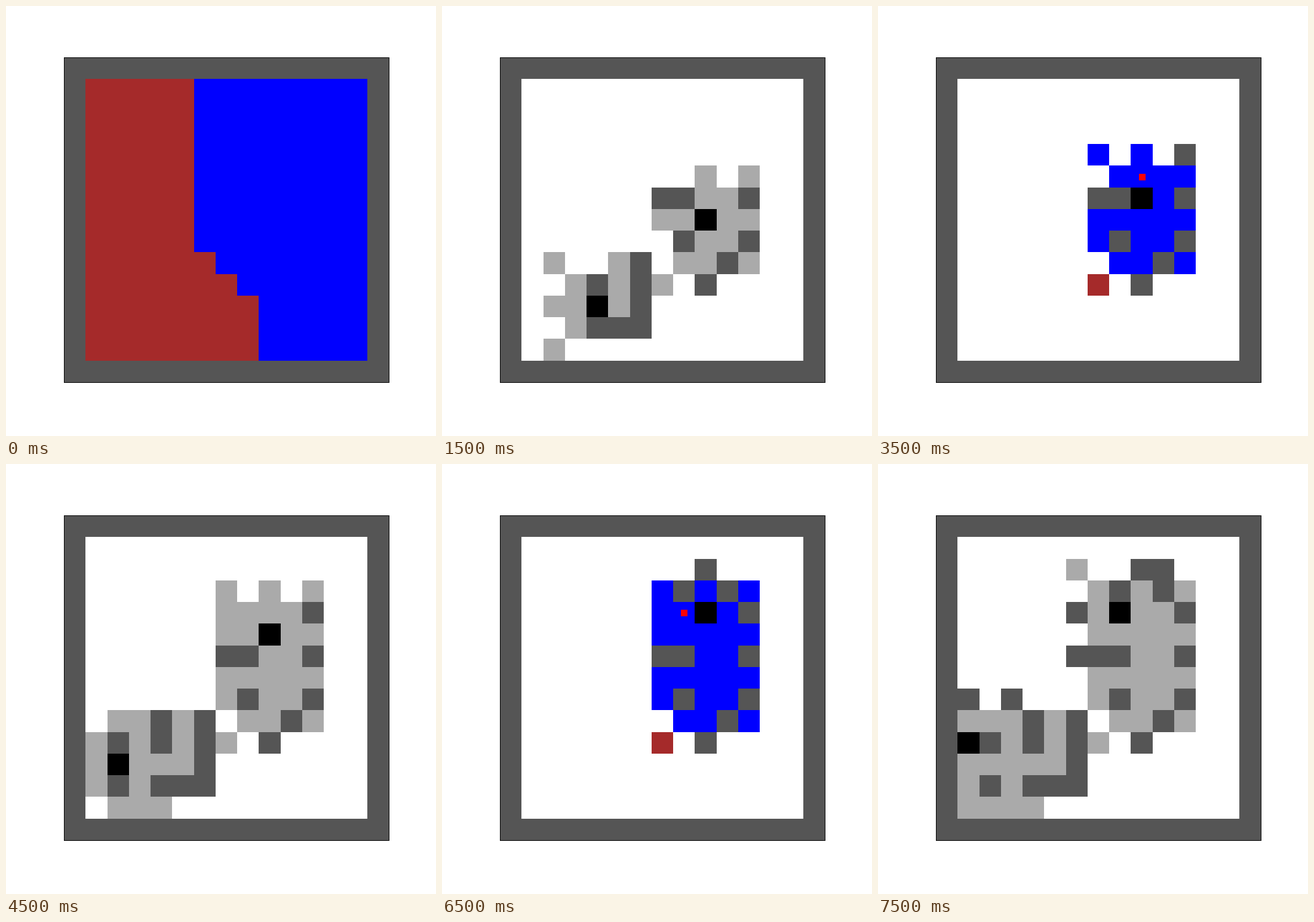
An HTML page with a canvas for the animation above (8 s loop, 720 by 720 pixels).

```html
<!DOCTYPE html>
<html lang="en">
<head>
<meta charset="utf-8">
<title>Two robots exploring a grid</title>
<style>
  html, body { margin: 0; width: 100%; height: 100%; overflow: hidden; background: #fff; }
  canvas { display: block; width: 720px; height: 720px; }
</style>
</head>
<body>
<canvas id="stage" width="720" height="720"></canvas>
<script>
const ctx = document.getElementById('stage').getContext('2d');

const STEP = 500, STEPS = 16;
const SIZE = 15, CELL = 544 / SIZE, LEFT = 97, TOP = 86;
const WALL = '#555555', SEEN = '#aaaaaa';

// Inner 13 x 13 cells; everything outside counts as wall.
const world = [
  '.............',
  '........##...',
  '.......#.#...',
  '.....#....#..',
  '.............',
  '.....###..#..',
  '.............',
  '#.#....#..#..',
  '...#.#...#...',
  '.#.#.#..#....',
  '.....#.......',
  '.#.###.......',
  '.............'
];

// One position [column, row] per turn.
const blue = { color: '#0000ff', path: [[9, 8], [9, 7], [9, 6], [9, 5], [9, 4], [8, 4]] };
const brown = { color: '#a52a2a', path: [[5, 11], [4, 11], [3, 11], [2, 11], [1, 11], [1, 10]] };

const edgeX = c => Math.round(LEFT + c * CELL);
const edgeY = r => Math.round(TOP + r * CELL);
const isWall = (c, r) => (world[r - 1] || '')[c - 1] !== '.';

function fillCell(c, r, color) {
  const x = edgeX(c), y = edgeY(r);
  ctx.fillStyle = color;
  ctx.fillRect(x, y, edgeX(c + 1) - x, edgeY(r + 1) - y);
}

// Each cell belongs to the robot whose start is nearer in Manhattan distance.
function ownerColor(c, r) {
  const distance = ({ path: [[x, y]] }) => Math.abs(c - x) + Math.abs(r - y);
  return distance(brown) < distance(blue) ? brown.color : blue.color;
}

// Eight rays, two cells long, each ending at the first wall.
function scan([x, y], visit) {
  visit(x, y);
  for (let dx = -1; dx <= 1; dx++) {
    for (let dy = -1; dy <= 1; dy++) {
      if (!dx && !dy) continue;
      for (let n = 1; n <= 2; n++) {
        const c = x + n * dx, r = y + n * dy;
        visit(c, r);
        if (isWall(c, r)) break;
      }
    }
  }
}

function drawKnown(robot, turn, colorOf) {
  for (const position of robot.path.slice(0, turn + 1)) {
    scan(position, (c, r) => fillCell(c, r, isWall(c, r) ? WALL : colorOf(c, r)));
  }
  fillCell(...robot.path[turn], '#000000');
}

function drawTarget([c, r]) {
  ctx.fillStyle = '#ff0000';
  ctx.fillRect(Math.round(LEFT + c * CELL + 13.25), Math.round(TOP + r * CELL + 13.25), 11, 11);
}

function drawRegions() {
  for (let r = 1; r < SIZE - 1; r++) {
    for (let c = 1; c < SIZE - 1; c++) fillCell(c, r, ownerColor(c, r));
  }
}

function drawBorder() {
  for (let i = 0; i < SIZE; i++) {
    for (const edge of [0, SIZE - 1]) {
      fillCell(i, edge, WALL);
      fillCell(edge, i, WALL);
    }
  }
  ctx.strokeStyle = '#000000';
  ctx.lineWidth = 1;
  ctx.strokeRect(LEFT + 0.5, TOP + 0.5, 544, 544);
}

// Each turn shows the shared map, then the blue view, then the brown view.
function draw(step) {
  const turn = Math.floor(step / 3), phase = step % 3;
  ctx.fillStyle = '#ffffff';
  ctx.fillRect(0, 0, 720, 720);
  if (step === 0) {
    drawRegions();
  } else if (phase === 0) {
    for (const robot of [blue, brown]) drawKnown(robot, turn, () => SEEN);
  } else {
    const robot = phase === 1 ? blue : brown;
    drawKnown(robot, turn, ownerColor);
    drawTarget(robot.path[turn + 1]);
  }
  drawBorder();
}

const start = performance.now();
let shown = -1;

function tick() {
  const step = Math.floor((performance.now() - start) / STEP) % STEPS;
  if (step !== shown) draw(shown = step);
  requestAnimationFrame(tick);
}
tick();
</script>
</body>
</html>
```
